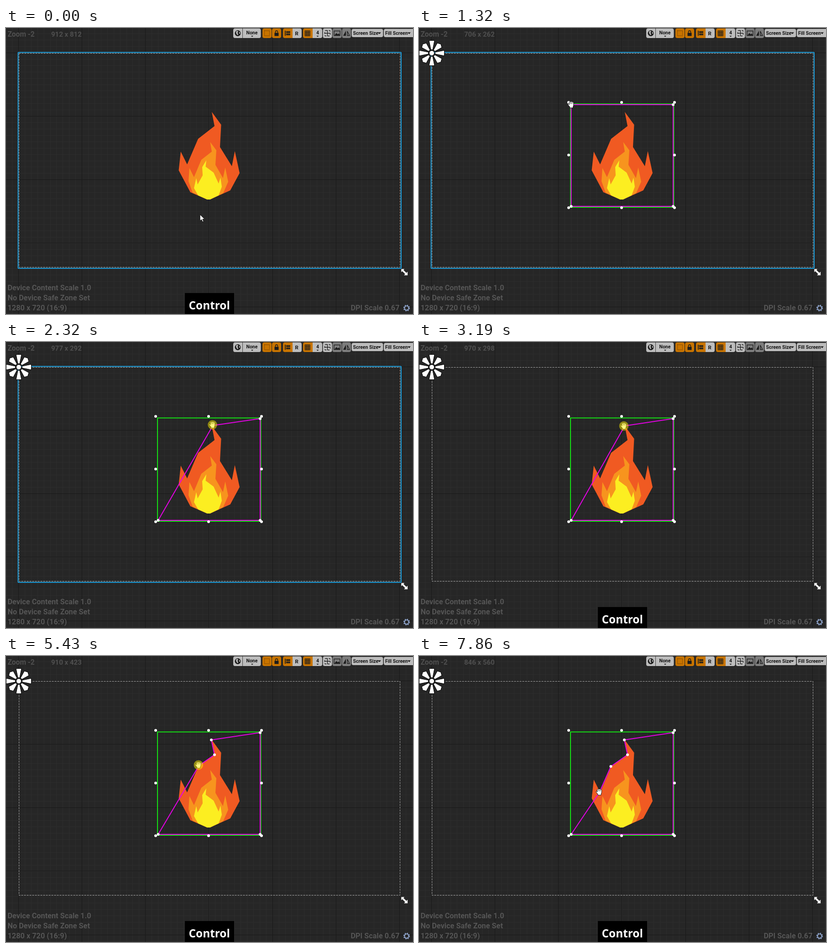
Animation of 892 by 627 pixels, one loop 8 s. Source, as an HTML page:

```html
<!DOCTYPE html>
<html lang="en">
<head>
<meta charset="utf-8">
<title>Polygon editing</title>
<style>
  html, body { margin: 0; width: 100%; height: 100%; overflow: hidden; background: #262626; }
  svg { display: block; width: 892px; height: 627px; }
  text { font-family: Roboto, sans-serif; font-weight: 700; }
  .info { font-size: 16.3px; fill: #555; }
  .top { font-size: 15.6px; fill: #4f4f4f; }
  .bar text { font-size: 10.5px; fill: #151515; }
  .key { font: 700 24.4px "Noto Sans", "Open Sans", sans-serif; fill: #fff; }
  .on { fill: #c87400; }
  .off { fill: #bdbdbd; }
  .dim { fill: #7d7d7d; }
  .icon { fill: none; stroke: #1c1c1c; stroke-width: 1.3; }
  .ink { fill: #1c1c1c; }
  .dots { fill: #fff; }
</style>
</head>
<body>
<svg viewBox="0 0 892 627">
  <rect width="892" height="627" fill="#262626"/>
  <g shape-rendering="crispEdges">
    <path id="minor" stroke="#2d2d2d"/>
    <path id="major" stroke="#191919"/>
  </g>

  <g id="flame">
    <path fill="#f05a22" d="M451 184L471.500 212L469 261L495 303L501.500 270L512 318L491.500 356L447 376H441L404 360L378.500 312L383 271L397 299L421 243L457 215Z"/>
    <path fill="#f7941e" d="M447.500 250L461 268L459 300L475.500 329L480.500 306L487 337L476 362L447 376H441L409 361L400 336L402 307L412 327L428 289L451 271Z"/>
    <path fill="#fcee21" d="M439 290L437.500 304L455 317L466 341L470 328L473 348L466 367L447 376H441L421 367L412 351L417 329L420 343L431 323L430 305Z"/>
  </g>

  <rect x="28.500" y="55.500" width="835" height="469" fill="none" stroke="#b4b4b4" stroke-dasharray="4 2"/>
  <rect id="hover" x="26.500" y="53.500" width="839.500" height="473.500" rx="1" fill="none" stroke="#1b9ddb" stroke-width="2"/>

  <g id="selection">
    <rect x="332" y="166.500" width="226.500" height="226.500" fill="none" stroke="#12e012" stroke-width="2"/>
    <path id="polygon" fill="none" stroke="#e600e6" stroke-width="2" stroke-linejoin="round"/>
    <g id="handles" class="dots"></g>
    <g id="vertices" class="dots"></g>
    <g id="anchor" transform="translate(28 55)" fill="#fff" stroke="#000"></g>
  </g>

  <text class="top" x="3.500" y="19">Zoom -2</text>
  <text id="readout" class="top" x="99" y="18.500" style="font-size:15px"></text>
  <text class="info" x="3.500" y="575">Device Content Scale 1.0</text>
  <text class="info" x="3.500" y="597">No Device Safe Zone Set</text>
  <text class="info" x="3.500" y="619">1280 x 720 (16:9)</text>
  <text class="info" x="862.500" y="619" text-anchor="end">DPI Scale 0.67</text>

  <g class="bar">
    <rect class="off" x="498" y="1" width="60.500" height="21" rx="4"/>
    <circle class="ink" cx="508" cy="11.500" r="6.500"/>
    <path fill="#bdbdbd" d="M504 8l3-2l2 2l-2 3l2 2l-1 3l-3-3zM511 8l2 2v3l-2-1z"/>
    <path stroke="#444" d="M518.500 1v21"/>
    <text x="526.500" y="13.500">None</text>
    <path class="ink" d="M537 17h5l-2.500 2.500z"/>

    <rect class="on" x="562" y="1" width="20" height="21" rx="4"/>
    <rect class="icon" x="566.500" y="6" width="11" height="11" stroke-dasharray="2 1" style="stroke:#8a4d00"/>
    <rect class="on" x="583" y="1" width="20" height="21" rx="4"/>
    <rect class="ink" x="588.500" y="10.500" width="9" height="7"/>
    <path class="icon" d="M590.500 11V8.500a2.500 2.500 0 0 1 5 0V11"/>

    <path class="on" d="M628 1H611q-4 0-4 4v13q0 4 4 4h17z"/>
    <path class="ink" d="M611 6h2v11h-2zM614 7h9v4h-9zM614 12h9v4h-9z" opacity=".85"/>
    <path class="off" d="M628 1h16q4 0 4 4v13q0 4-4 4h-16z"/>
    <text x="633.500" y="15.500" style="font-size:11.500px">R</text>

    <path class="on" d="M672 1H655q-4 0-4 4v13q0 4 4 4h17z"/>
    <path class="icon" d="M655.500 6v11M659 6v11M662.500 6v11M666 6v11M655 6.500h11.500M655 10h11.500M655 13.500h11.500M655 17h11.500"/>
    <path class="off" d="M672 1h17q4 0 4 4v13q0 4-4 4h-17z"/>
    <text x="680" y="13.500">4</text>
    <path class="ink" d="M680.500 17h5l-2.500 2.500z"/>

    <rect class="off" x="694.500" y="1" width="20" height="21" rx="4"/>
    <rect class="icon" x="698.500" y="5.500" width="12" height="12" rx="2" stroke-dasharray="4 3"/>
    <path class="icon" d="M698 11.500h13M704.500 5v13"/>
    <rect class="dim" x="715.500" y="1" width="20" height="21" rx="4"/>
    <rect class="icon" x="719" y="6.500" width="13" height="10"/>
    <path class="ink" d="M720 16l4-5l3 3l2-2l3 4z"/>
    <rect class="dim" x="736.500" y="1" width="19.500" height="21" rx="4"/>
    <path class="ink" d="M745 6v11h-6z"/>
    <path class="icon" d="M748 7v9.500h5z"/>

    <rect class="off" x="757.500" y="2" width="69" height="18" rx="4"/>
    <text x="760.500" y="15">Screen Size</text>
    <path class="ink" d="M815 9.500h7l-3.500 4z"/>
    <rect class="off" x="828" y="2" width="68" height="18" rx="4"/>
    <text x="831" y="15">Fill Screen</text>
    <path class="ink" d="M880 9.500h7l-3.500 4z"/>
  </g>

  <path fill="#fff" stroke="#111" stroke-width=".6" d="M866 528h8l-2.500 2.500l6 6l3-3v9h-9l3-3l-6-6l-2.500 2.500z"/>
  <g transform="translate(878 614)" fill="none" stroke="#91a7cf">
    <circle r="4.600" stroke-width="1.800"/>
    <circle r="6.200" stroke-width="2" stroke-dasharray="2.435"/>
  </g>

  <g id="control">
    <rect x="392" y="581" width="108" height="46"/>
    <text class="key" x="400.500" y="617">Control</text>
  </g>

  <g id="cursor">
    <path id="arrow" fill="#fff" stroke="#000" stroke-width=".9" transform="translate(1.500 1.500) scale(.92)" d="M0 0V15L3.600 11.800L6 17.300L8.500 16.200L6.100 10.800H11Z"/>
    <g id="hand" stroke="#111" stroke-width=".9">
      <path fill="#fff" d="M-3 7V5L-7 0Q-7-2.500-4.800-1.500L-4 0L-4.700-5Q-3.500-7-2.300-5.500Q-1.500-8 0-6.300Q1.500-7.800 2.600-5.700Q4.700-6.500 5.200-4Q6 1 4 5V7Z"/>
      <path fill="none" stroke-width=".7" d="M-2.200-5.500L-1.700-1.500M.2-6.200V-1.500M2.700-5.500L2.300-1.500"/>
    </g>
    <circle id="press" r="10.300" fill="#fff000" opacity=".5"/>
  </g>
</svg>
<script>
const LOOP = 8000;
const $ = id => document.getElementById(id);
const SVG = 'http://www.w3.org/2000/svg';

// Cursor hotspot: time, x, y
const PATH = [
  [80, 423.72, 407.54], [390, 415, 320], [500, 415, 320], [755, 371.1, 215.4], [775, 371.1, 215.4],
  [1000, 350, 185], [1320, 333.5, 168], [1410, 333.5, 168], [1720, 399.8, 177], [2020, 445, 182.5],
  [2170, 445, 182.5], [2320, 452.5, 181.5], [2790, 452.5, 181.5], [2870, 448.95, 184.05],
  [3190, 448.95, 184.05], [3950, 456.5, 212], [4030, 455.9, 214.5], [5000, 455.9, 214.5],
  [5430, 421.8, 238.9], [5510, 420.5, 239.5], [5660, 419.5, 240.5], [6540, 419.5, 240.5],
  [7390, 398, 294], [7690, 398, 294], [7770, 395, 298]
];
// Each drag moves one vertex and leaves it at x, y
const DRAGS = [
  { from: 1400, to: 2490, x: 450, y: 184 },
  { from: 3040, to: 4385, x: 457, y: 216.5 },
  { from: 4820, to: 6020, x: 420.5, y: 242 },
  { from: 6440, to: 7820, x: 395.5, y: 299 }
];
const START = [333.5, 168];
const CORNERS = [[333.5, 391], [557, 391], [557, 168]];

const within = (t, a, b) => t >= a && t < b;
const show = (id, visible) => $(id).setAttribute('visibility', visible ? 'inherit' : 'hidden');

function add(parent, name, attrs) {
  const node = document.createElementNS(SVG, name);
  for (const key in attrs) node.setAttribute(key, attrs[key]);
  return $(parent).appendChild(node);
}

function cursorAt(t) {
  const next = PATH.findIndex(p => p[0] > t);
  if (next === 0) return PATH[0].slice(1);
  if (next < 0) return PATH[PATH.length - 1].slice(1);
  const [a, b] = [PATH[next - 1], PATH[next]];
  const k = (t - a[0]) / (b[0] - a[0]);
  return [a[1] + (b[1] - a[1]) * k, a[2] + (b[2] - a[2]) * k];
}

function gridPath(step) {
  let d = '';
  for (let x = 27.4 % step; x < 892; x += step) d += `M${Math.floor(x) + 0.5} 0V627`;
  for (let y = 54.4 % step; y < 627; y += step) d += `M0 ${Math.floor(y) + 0.5}H892`;
  return d;
}

function buildScene() {
  $('minor').setAttribute('d', gridPath(13.92));
  $('major').setAttribute('d', gridPath(139.2));
  for (const x of [328, 444, 560])
    for (const y of [163, 278.5, 394])
      if (x !== 444 || y !== 278.5) add('handles', 'circle', { cx: x, cy: y, r: 3 });
  for (let i = 0; i < 8; i++) {
    const end = i % 2 ? 'L-7-24L0-28L7-24' : 'L-6-27.500H6';
    add('anchor', 'path', { d: `M-2-7.500${end}L2-7.500Z`, transform: `rotate(${i * 45})` });
  }
  add('anchor', 'circle', { r: 5.5 });
}

const dots = [];
function drawPolygon(t, [x, y]) {
  const moved = DRAGS.filter((drag, i) => !i || t >= drag.from).map(drag =>
    t < drag.from ? START : t < drag.to ? [x + 1, y + 1.5] : [drag.x, drag.y]);
  const points = [...moved, ...CORNERS];
  $('polygon').setAttribute('d', `M${points.join('L')}Z`);
  while (dots.length < points.length) dots.push(add('vertices', 'circle', { r: 3 }));
  dots.forEach((dot, i) => {
    const p = points[i];
    dot.setAttribute('r', p ? 3 : 0);
    if (p) {
      dot.setAttribute('cx', p[0]);
      dot.setAttribute('cy', p[1]);
    }
  });
}

function draw(t) {
  const pos = cursorAt(t);
  const [rx, ry] = cursorAt(t - 12);
  $('readout').textContent = `${Math.round((rx - 27.2) * 2.3)} x ${Math.round((ry - 54.5) * 2.3)}`;
  $('cursor').setAttribute('transform', `translate(${pos})`);
  drawPolygon(t, pos);
  show('selection', t >= 240);
  show('hover', t < 160 || within(t, 1240, 1400) || within(t, 1490, 2790));
  show('control', t < 310 || t >= 2790);
  show('arrow', t < 1320);
  show('hand', t >= 1320);
  show('press', within(t, 230, 320) || DRAGS.some(drag => within(t, drag.from, drag.to)));
}

buildScene();
const origin = performance.now();
function tick() {
  draw((performance.now() - origin) % LOOP);
  requestAnimationFrame(tick);
}
tick();
</script>
</body>
</html>
```
